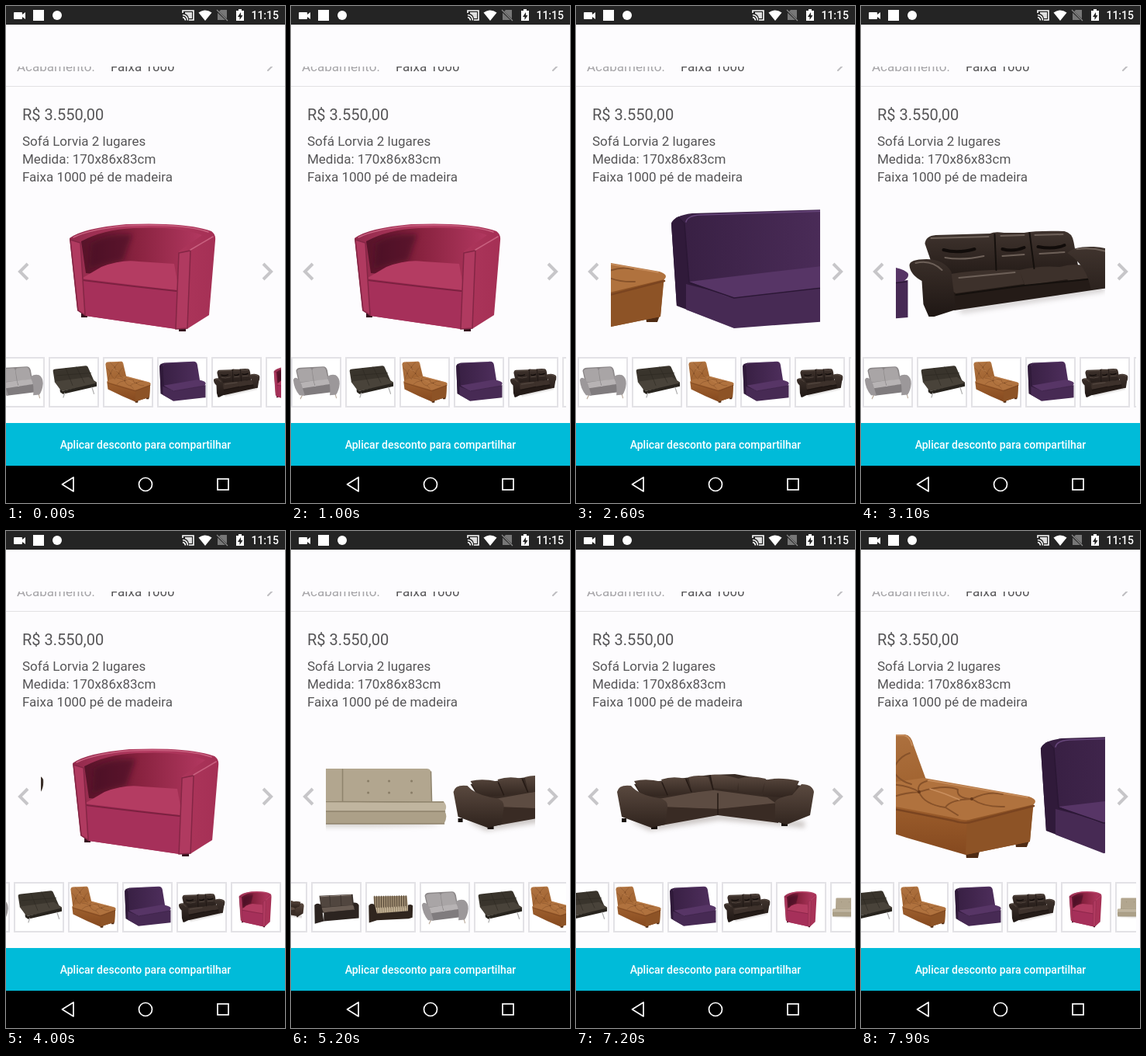
An HTML page for the animation above (8 s loop, 360x640 px).

```html
<!DOCTYPE html>
<html lang="pt-BR">
<head>
<meta charset="utf-8">
<title>Galeria de sofás</title>
<style>
html, body { margin: 0; width: 100%; height: 100%; overflow: hidden; background: #fdfcfe; }
svg { display: block; width: 360px; height: 640px; font-family: Roboto, sans-serif; }
.copy { font-size: 17px; fill: #565557; }
.line { fill: none; stroke-linecap: round; stroke-linejoin: round; }
</style>
</head>
<body>
<svg viewBox="0 0 360 640">
<defs>
  <clipPath id="stageClip"><rect x="45" y="245" width="270" height="195"/></clipPath>
  <clipPath id="stripClip"><rect y="450" width="355" height="69"/></clipPath>
  <clipPath id="rowClip"><rect y="78" width="360" height="24"/></clipPath>
  <filter id="soft" x="-20%" y="-100%" width="140%" height="300%"><feGaussianBlur stdDeviation="3"/></filter>
  <linearGradient id="wine" x2="1"><stop stop-color="#932a4c"/><stop offset=".5" stop-color="#b33a60"/><stop offset="1" stop-color="#a53055"/></linearGradient>
  <linearGradient id="wineIn" x2="1"><stop stop-color="#561329"/><stop offset=".45" stop-color="#88223f"/><stop offset="1" stop-color="#b23860"/></linearGradient>
  <linearGradient id="rust" x2=".3" y2="1"><stop stop-color="#b07442"/><stop offset="1" stop-color="#a0622f"/></linearGradient>
  <linearGradient id="rustSide" x2="0" y2="1"><stop stop-color="#a1622f"/><stop offset="1" stop-color="#85491f"/></linearGradient>
  <linearGradient id="plum" x2="1"><stop stop-color="#371f42"/><stop offset="1" stop-color="#4e2e5c"/></linearGradient>
  <linearGradient id="hide" x2="0" y2="1"><stop stop-color="#40342e"/><stop offset="1" stop-color="#1f1714"/></linearGradient>
  <linearGradient id="cocoa" x2="0" y2="1"><stop stop-color="#5b4a40"/><stop offset="1" stop-color="#2f231d"/></linearGradient>

  <g id="p0">
    <path class="line" stroke="#b9a99a" stroke-width="5" d="M56 138L44 153M244 132L252 150"/>
    <path fill="#8b8788" d="M18 46Q22 34 44 34L176 29Q194 29 200 44L214 98L40 110Z"/>
    <path fill="#a9a5a6" d="M24 46Q30 38 50 38L98 36Q108 36 110 46L118 84L40 90ZM112 44Q114 35 126 35L176 32Q188 33 192 44L204 80L122 84Z"/>
    <path fill="#b7b3b4" d="M38 92L118 84L128 108L54 116ZM121 84L204 78L218 96L132 108Z"/>
    <path fill="#807c7e" d="M48 114L218 97L226 128L62 142Z"/>
    <path fill="#9c989a" d="M2 82Q6 70 24 74Q44 82 54 108L70 142L38 140Q6 116 2 82ZM198 70Q216 58 248 62Q272 72 271 96Q268 122 250 138L214 140Q222 100 198 70Z"/>
  </g>
  <g id="p1">
    <path fill="#39342c" d="M14 46Q16 39 30 39L204 26Q216 26 220 36L252 84L66 114L24 88Z"/>
    <path fill="#49433a" d="M22 88L222 70L268 90Q270 96 262 99L70 124Q60 124 54 116Z"/>
    <path fill="#28241e" d="M54 117L70 124L268 93V106L72 136L56 128Z"/>
    <path class="line" stroke="#2b2720" stroke-width="2" d="M88 36L128 102M150 31L196 92M35 64L235 54"/>
    <path class="line" stroke="#aaa" stroke-width="5" d="M82 132L74 148M240 110L252 134"/>
  </g>
  <g id="p2">
    <path fill="#4f2b13" d="M176 160h18l-2 9h-15ZM240 147h18l-3 8h-14Z"/>
    <path fill="url(#rust)" d="M4 20Q6 11 18 12L98 10Q106 11 109 24L125 68L60 100L18 94Z"/>
    <path fill="url(#rustSide)" d="M12 86L178 116L264 96L259 148L176 165L100 143L18 117Z"/>
    <path fill="#8d5326" d="M178 120L263 100L259 148L176 165Z"/>
    <path fill="#b0723e" d="M20 86Q24 78 50 76L122 66L258 90Q270 94 264 100L184 119Q176 122 164 118L24 91Z"/>
    <path class="line" stroke="#7a4420" stroke-width="2.500" d="M18 93L160 121Q174 126 186 122L264 102"/>
    <g class="line" stroke="#87522a" stroke-width="2">
      <path d="M12 36Q26 40 34 56Q42 38 58 32Q64 50 82 56Q90 38 104 34M34 56Q42 72 58 78Q66 62 82 56Q90 70 106 74M30 13Q42 20 58 32Q68 20 82 13M20 76Q26 64 34 56"/>
      <path d="M70 74Q100 74 116 84Q112 74 126 70M116 84Q150 74 166 81Q164 92 184 93Q206 82 224 87M70 98Q84 86 116 84Q122 100 150 104Q156 94 184 93Q200 104 226 103M150 104L166 114"/>
    </g>
    <path class="line" stroke="#c98f5e" stroke-width="1.500" d="M18 13L96 11Q104 12 107 24M128 69L256 91M44 36Q60 46 76 47M130 80Q150 86 168 94"/>
    <g fill="#66381a"><circle cx="34" cy="56" r="2"/><circle cx="58" cy="32" r="2"/><circle cx="82" cy="56" r="2"/><circle cx="116" cy="84" r="2"/><circle cx="184" cy="93" r="2"/></g>
  </g>
  <g id="p3">
    <path fill="url(#plum)" d="M3 28Q6 18 30 15L200 10Q218 10 222 22L238 88L70 118L10 134Z"/>
    <path fill="#301a3a" d="M3 28L10 20L20 28L26 104L84 126V162L10 134Z"/>
    <path fill="#472a54" d="M22 106L84 122L270 101V149L84 163L22 139Z"/>
    <path fill="#573566" d="M26 103L222 80Q264 84 270 92Q273 98 262 104L90 124Q76 124 64 118Z"/>
    <path class="line" stroke="#2b1735" stroke-width="1.500" d="M12 20L20 28L26 104L84 124L268 103"/>
    <path class="line" stroke="#66457a" stroke-width="1.500" d="M22 26Q24 18 40 17L204 12"/>
  </g>
  <g id="p4">
    <path fill="#77706c" opacity=".3" filter="url(#soft)" d="M64 138L254 108V116L70 144Z"/>
    <path fill="url(#hide)" d="M22 54Q23 44 36 43L106 41Q112 38 124 40L150 40Q166 37 202 38Q212 40 214 52L222 95L40 106Z"/>
    <path fill="#241b17" d="M46 104L250 86L258 111L60 140Z"/>
    <path fill="#3d312b" d="M48 94Q100 86 144 88L150 106L62 118Q50 112 48 94ZM144 88Q170 82 196 84L206 100L151 108ZM196 84Q216 78 240 84L250 96L207 102Z"/>
    <path class="line" stroke="#15100d" stroke-width="2" d="M112 42L114 88M157 40L163 86M62 120L150 108L252 98"/>
    <path class="line" stroke="#110c0a" stroke-width="4" d="M46 62Q64 67 86 61M122 61Q136 65 150 59M168 58Q188 62 202 56"/>
    <path class="line" stroke="#6d6058" stroke-width="2" d="M30 47L104 45M120 44L150 43M164 43L200 42M48 72Q70 76 98 70M122 70L150 68M170 67L202 65"/>
    <path fill="url(#hide)" d="M2 82Q2 74 24 74Q46 74 56 90L62 139L34 148H27L20 132L18 102Q3 94 2 82ZM206 66Q214 57 240 58Q266 60 269 68Q270 80 264 86L258 111L236 113Q232 84 206 66Z"/>
    <path class="line" stroke="#6d6058" stroke-width="2" d="M10 79Q30 74 44 88M66 98L138 91M218 61Q240 58 262 66"/>
  </g>
  <g id="p5">
    <path fill="#35101d" d="M52 142h8v7h-8ZM178 160h9v7h-9Z"/>
    <path fill="url(#wine)" d="M37 47Q54 34 110 29Q188 26 220 38Q226 42 225 50L217 146L190 163L174 164L58 147L47 140Z"/>
    <path fill="url(#wineIn)" d="M52 51Q80 36 120 34Q176 31 208 43L178 64V104L58 92Z"/>
    <path fill="#430d20" opacity=".6" filter="url(#soft)" d="M64 54Q84 40 118 42L106 76L62 86Z"/>
    <path fill="#b43c62" d="M54 98L78 84Q104 74 126 77L172 80L177 108L174 116L60 103Z"/>
    <path fill="#a6305a" d="M53 99Q118 107 175 114V164L58 147Z"/>
    <path class="line" stroke="#7c2140" stroke-width="2" d="M54 101Q118 109 175 115"/>
    <path fill="#b03a60" stroke="#842645" stroke-width="1.500" d="M38 49L51 53L57 146L48 140ZM178 66L193 63L189 163L174 164Z"/>
    <path class="line" stroke="#c8607f" stroke-width="1.500" d="M42 46Q64 35 110 31Q184 28 216 39M193 62L222 45"/>
  </g>
  <g id="p6">
    <ellipse cx="135" cy="125" rx="125" ry="4" fill="#877f72" opacity=".35" filter="url(#soft)"/>
    <path fill="#b2a68f" d="M22 57Q22 54 28 54L244 54Q249 54 249 60L250 98H20Z"/>
    <path fill="#c0b59f" d="M4 96Q70 92 135 96T265 96Q271 102 267 109H3Q-1 102 4 96Z"/>
    <path fill="#aca088" d="M3 109H267Q271 116 266 125H4Q0 118 3 109Z"/>
    <path class="line" stroke="#8e836c" stroke-width="1.500" d="M135 55V96M3 109H267M4 125H266M22 96L265 97M249 58L250 96"/>
    <g fill="#887c66"><circle cx="55" cy="70" r="1.500"/><circle cx="100" cy="70" r="1.500"/><circle cx="168" cy="70" r="1.500"/><circle cx="195" cy="70" r="1.500"/><circle cx="224" cy="70" r="1.500"/><circle cx="168" cy="85" r="1.500"/><circle cx="195" cy="85" r="1.500"/><circle cx="224" cy="85" r="1.500"/></g>
  </g>
  <g id="p7">
    <path fill="#81766e" opacity=".4" filter="url(#soft)" d="M26 122L140 112L250 122V130L140 120L50 134Z"/>
    <path fill="#1a120e" d="M52 126h8v6h-8ZM220 122h8v6h-8ZM14 118h6v5h-6Z"/>
    <path fill="#382b24" d="M30 74L128 62L160 61L246 76L235 112L138 108L60 124Z"/>
    <path fill="#5d4c42" d="M62 93L128 81L202 91L215 100L140 106L72 104Z"/>
    <path fill="#392b24" d="M66 103L138 106V114L60 128ZM138 106L216 98V124L138 114Z"/>
    <path fill="url(#cocoa)" d="M30 70Q46 66 66 71L73 89L42 90ZM65 68Q80 63 96 67L103 85L74 88ZM100 65Q114 61 126 65L131 82L105 85ZM129 62Q146 61 165 67L163 82L132 79ZM164 67Q180 62 200 67L194 87L165 83ZM199 69Q216 64 243 70L233 92L196 89Z"/>
    <path fill="url(#cocoa)" d="M8 84Q10 74 26 76Q36 88 62 92Q74 94 73 104L70 126L52 130L14 116ZM212 97Q214 91 234 88L246 74Q260 74 262 84L257 114L227 126L212 122Z"/>
    <path class="line" stroke="#251a15" stroke-width="1.500" d="M138 86V113M66 72L73 88M97 68L104 84M128 64L132 81"/>
  </g>
  <g id="p8">
    <path fill="#39302b" d="M36 46L230 40L240 104L50 112Z"/>
    <path fill="#51463f" d="M40 50L94 47L100 88L46 90ZM98 47L158 45L162 84L103 88ZM162 45L222 43L230 82L166 84Z"/>
    <path class="line" stroke="#a2958b" stroke-width="3" d="M42 49L92 47M100 47L156 45M164 45L220 43"/>
    <path fill="#695c53" d="M48 92L232 82L246 98L62 110Z"/>
    <path fill="#2c2420" d="M8 82Q22 70 48 80L62 144L10 154ZM232 72Q258 70 266 82V132L62 144V110L240 100Z"/>
  </g>
  <g id="p9">
    <path fill="#9d8b70" d="M36 48L230 46L236 92L250 104L52 116L40 90Z"/>
    <path class="line" stroke="#4d3f31" stroke-width="48" stroke-dasharray="4 9" style="stroke-linecap:butt" d="M40 70L232 68"/>
    <path class="line" stroke="#cbbb9f" stroke-width="20" stroke-dasharray="6 7" style="stroke-linecap:butt" d="M50 102L240 95"/>
    <path fill="#30251e" d="M8 84Q20 72 42 80L56 114L236 104V82Q254 76 264 84L262 130L240 134L56 140L10 150Z"/>
  </g>
</defs>

<rect width="360" height="640" fill="#fdfcfe"/>
<g clip-path="url(#rowClip)" font-size="17">
  <text x="14" y="84" fill="#a6a5a8">Acabamento:</text>
  <text x="135" y="84" fill="#565557">Faixa 1000</text>
  <path class="line" stroke="#bebdc0" stroke-width="2" d="M338 72L344 77L338 83"/>
</g>
<path stroke="#e2e1e4" d="M0 103.500H360"/>
<text x="21" y="147" font-size="20" fill="#565557">R$ 3.550,00</text>
<g class="copy">
  <text x="21" y="180">Sofá Lorvia 2 lugares</text>
  <text x="21" y="203">Medida: 170x86x83cm</text>
  <text x="21" y="226">Faixa 1000 pé de madeira</text>
</g>

<g clip-path="url(#stageClip)"><g id="slides"></g></g>
<path fill="none" stroke="#c7c6c9" stroke-width="4" d="M28 332L18 342L28 352M332 332L342 342L332 352"/>
<g clip-path="url(#stripClip)"><g id="thumbs"></g></g>

<rect y="537" width="360" height="55" fill="#00bbd9"/>
<text x="180" y="570" text-anchor="middle" font-size="14" font-weight="500" fill="#fff">Aplicar desconto para compartilhar</text>
<rect y="592" width="360" height="48"/>
<g fill="none" stroke="#fff" stroke-width="1.700">
  <path stroke-linejoin="round" d="M87 607V625L72.500 616Z"/>
  <circle cx="180" cy="616" r="8.500"/>
  <rect x="273" y="609" width="14" height="14"/>
</g>

<rect width="360" height="24" fill="#242424"/>
<g fill="#fff">
  <path d="M11 8h9q1 0 1 1v2l4-3v9l-4-3v2q0 1-1 1h-9q-1 0-1-1V9q0-1 1-1Z"/>
  <rect x="35" y="5" width="14" height="14"/>
  <circle cx="66" cy="12" r="6"/>
  <path d="M248.500 8.500Q257 2.500 265.500 8.500L257 19Z"/>
  <path fill="#777" d="M273 9L277 5H285V18H273Z"/>
  <path d="M300 4h4v2h3v13h-10V6h3Z"/>
  <path fill="#242424" d="M303 8l-4 6h2.500v4l4-6H303Z"/>
  <text x="352" y="17" text-anchor="end" font-size="14" font-weight="500">11:15</text>
</g>
<path stroke="#242424" stroke-width="2.500" d="M271 5L287 20"/>
<path stroke="#888" stroke-width="1.300" d="M272 5L286 19"/>
<g fill="none" stroke="#fff" stroke-width="1.600">
  <path d="M228 9V6H242V18H236M228 11.500Q234 12 234.500 18.500M228 14.500Q231 15 231.500 18.500"/>
  <path fill="#ddd" stroke="none" d="M231 8H240V16H236Q235 11 231 10Z"/>
</g>
</svg>

<script>
const LOOP = 8000, STEP = 100, COUNT = 10, SLIDE_MS = 900;
const slides = document.getElementById('slides');
const thumbs = document.getElementById('thumbs');

// start time, from item, to item
const moves = [[1300, 5, 2], [2394, 2, 4], [3244, 4, 5], [4822, 5, 7], [7279, 7, 2]];
// time, strip offset
const scroll = [[0, -15], [250, -15], [1100, 2], [3200, 2], [3900, -60], [4150, -60],
  [5200, -534], [6300, -724], [6700, -792], [LOOP, -792]];

let html = '';
for (let i = 0; i < COUNT; i++) html += `<use href="#p${i}" x="${i * 270}"/>`;
slides.innerHTML = html;

html = '';
for (let i = 0; i < 18; i++) {
  html += `<g transform="translate(${i * 70} 452)">
    <rect x="1" y="1" width="63" height="63" fill="#fff" stroke="#e3e2e6" stroke-width="2"/>
    <use href="#p${i % COUNT}" transform="translate(2.5 2.5) scale(${60 / 270} ${60 / 180})"/></g>`;
}
thumbs.innerHTML = html;

const bezier = (a, b, s) => 3 * a * s * (1 - s) ** 2 + 3 * b * s * s * (1 - s) + s ** 3;

// Same curve as the CSS keyword "ease"
function ease(u) {
  let lo = 0, hi = 1;
  for (let i = 0; i < 20; i++) {
    const mid = (lo + hi) / 2;
    if (bezier(.25, .25, mid) < u) lo = mid; else hi = mid;
  }
  return bezier(.1, 1, lo);
}

function itemAt(t) {
  let item = 5;
  for (const [start, from, to] of moves) {
    if (t >= start) item = from + (to - from) * ease(Math.min(1, (t - start) / SLIDE_MS));
  }
  return item;
}

function scrollAt(t) {
  const i = scroll.findIndex(p => p[0] > t);
  const [t0, x0] = scroll[i - 1], [t1, x1] = scroll[i];
  return x0 + (x1 - x0) * (t - t0) / (t1 - t0);
}

function draw(now) {
  const t = Math.floor(now % LOOP / STEP) * STEP;
  slides.setAttribute('transform', `translate(${45 - itemAt(t) * 270} 252)`);
  thumbs.setAttribute('transform', `translate(${scrollAt(t)} 0)`);
  requestAnimationFrame(draw);
}
draw(performance.now());
</script>
</body>
</html>
```
